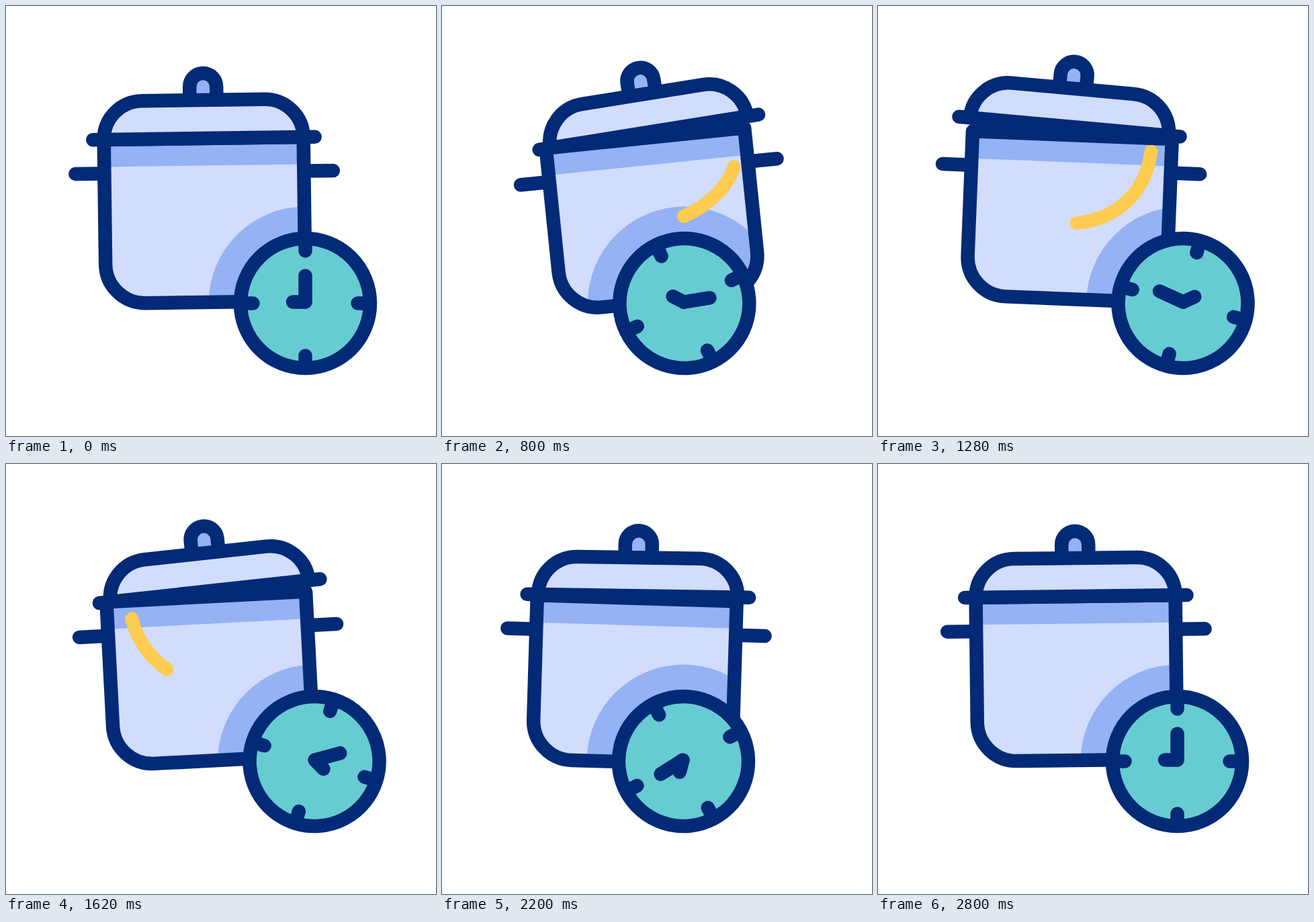
Write an HTML page that moves like this. It is 640 by 640 pixels and loops after 2.9 s.

```html
<!DOCTYPE html>
<html lang="en">
<head>
<meta charset="utf-8">
<title>Cooking time</title>
<style>
  html, body { margin: 0; width: 100%; height: 100%; overflow: hidden; background: #fff; }
  svg { display: block; width: 100%; height: 100%; }
  .line { fill: none; stroke: #032a76; stroke-width: 20.5; stroke-linecap: round; stroke-linejoin: round; }
  .pale { fill: #d2dcfd; }
  .mid { fill: #94b2f4; }
  .teal { fill: #67ccd1; }
  .glow { fill: none; stroke: #ffcb50; stroke-width: 20; stroke-linecap: round; }
</style>
</head>
<body>
<svg viewBox="0 0 640 640">
  <defs>
    <path id="body" d="M144.5 197V383A58.5 58.5 0 0 0 203 441H383A58.5 58.5 0 0 0 441.5 383V197Z"/>
    <clipPath id="inside"><use href="#body" class="pot"/></clipPath>
  </defs>

  <g class="pot">
    <use href="#body" class="pale"/>
    <path class="mid" d="M145 197H441V237.5H145Z"/>
  </g>
  <g clip-path="url(#inside)"><circle id="shade" class="mid" cy="442.5" r="144"/></g>
  <g class="pot line">
    <use href="#body"/>
    <path d="M101.5 247.5H144M442 247.5H485"/>
  </g>

  <g id="lid" class="line">
    <path class="mid" d="M273 140V120A20 20 0 0 1 313 120V140"/>
    <path class="pale" d="M144.5 197A57.5 57 0 0 1 202 140H384A57.5 57 0 0 1 441.5 197"/>
    <path d="M128 197H458.5"/>
  </g>

  <g class="pot glow">
    <path id="sweepRight" pathLength="1" d="M197 289C227 306 263 322 303 325C348 324 405 292 420 253"/>
    <path id="sweepLeft" pathLength="1" d="M411 217C405 279 363 321 301 328C243 325 193 284 181 224"/>
  </g>
  <g id="rays" class="glow"></g>

  <g id="clock" class="line">
    <circle class="teal" r="96.5"/>
    <path d="M0-96V-78M0 96V78M-96 0H-78M96 0H78"/>
    <path id="minute" d="M0 0V-39"/>
    <path id="hour" d="M0 0H-18.5"/>
  </g>
</svg>
<script>
const LOOP = 2900, START = 180, END = 2800;
const $ = id => document.getElementById(id);
const pots = document.querySelectorAll('.pot');
const clockTimes = [START, 725, 1480, 2115, END];

// Smooth 0..1 progress between two times
function ease(t, from, to) {
  const p = Math.min(1, Math.max(0, (t - from) / (to - from)));
  return p * p * (3 - 2 * p);
}

// Eases through values reached at the times given by timeOf(index)
function track(t, timeOf, values) {
  return values.reduce((sum, value, i) =>
    i ? sum + (value - values[i - 1]) * ease(t, timeOf(i - 1), timeOf(i)) : value, 0);
}
const every = (start, gap) => i => start + gap * i;
const atClock = i => clockTimes[i];

const setTransform = (el, value) => el.setAttribute('transform', value);
const swing = (angle, y) => `translate(0 ${y}) rotate(${angle} 293 105)`;

// Shows the part of a stroke between its tail and head
function trim(el, head, tail) {
  const length = head - tail;
  el.style.display = length > 0.001 ? '' : 'none';
  el.setAttribute('stroke-dasharray', `${length} 9`);
  el.setAttribute('stroke-dashoffset', -tail);
}

// A fan of three rays beside the pot; side is -1 for left, 1 for right
function addRays(side, x, y, inner, outer) {
  for (let i = 0; i < 3; i++) {
    const angle = i * Math.PI / 8;
    const point = r => `${x + side * r * Math.cos(angle)} ${y - r * Math.sin(angle)}`;
    const ray = document.createElementNS('http://www.w3.org/2000/svg', 'path');
    ray.setAttribute('d', `M${point(inner)}L${point(outer)}`);
    ray.setAttribute('pathLength', 1);
    $('rays').append(ray);
  }
}

function drawPot(t) {
  const tilt = track(t, every(380, 420), [-0.75, -5.85, 2.6, -3, 2.4, -0.15, -0.75]);
  const y = track(t, every(START, 310), [0, -6.2, 0, -4.2, -5.2, 3, 6, 0]);
  pots.forEach(el => setTransform(el, swing(tilt, y)));

  // The lid rattles on the steam, higher when it opens to the left
  const steam = ease(t, START, 470) * (1 - ease(t, 1940, 2400));
  const rattle = 3.5 * Math.cos(Math.PI * (t - 480) / 365);
  const lift = 10.3 + 0.7 * rattle;
  setTransform($('lid'), swing(tilt + steam * rattle, y - steam * lift));
}

function drawClock(t) {
  const x = 445.5 + track(t, atClock, [0, -88, 28.5, -90, 0]);
  const roll = track(t, atClock, [0, -27.5, 24, -29, 0]);
  $('shade').setAttribute('cx', x);
  setTransform($('clock'), `translate(${x} 442.5) rotate(${roll})`);
  const turn = 360 * ease(t, 160, END);
  setTransform($('minute'), `translate(0 -2) rotate(${2 * turn})`);
  setTransform($('hour'), `translate(0 -2) rotate(${turn})`);
}

function drawGlow(t) {
  trim($('sweepRight'), ease(t, 320, 800), ease(t, 480, 1060));
  trim($('sweepLeft'), ease(t, 1030, 1540), ease(t, 1280, 1800));
  for (const ray of $('rays').children) trim(ray, ease(t, 2290, 2550), ease(t, 2460, 2720));
}

addRays(-1, 215, 228, 130, 194);
addRays(1, 358, 218, 127, 179);

const begin = performance.now();
function tick() {
  const t = (performance.now() - begin) % LOOP;
  drawPot(t);
  drawClock(t);
  drawGlow(t);
  requestAnimationFrame(tick);
}
tick();
</script>
</body>
</html>
```
